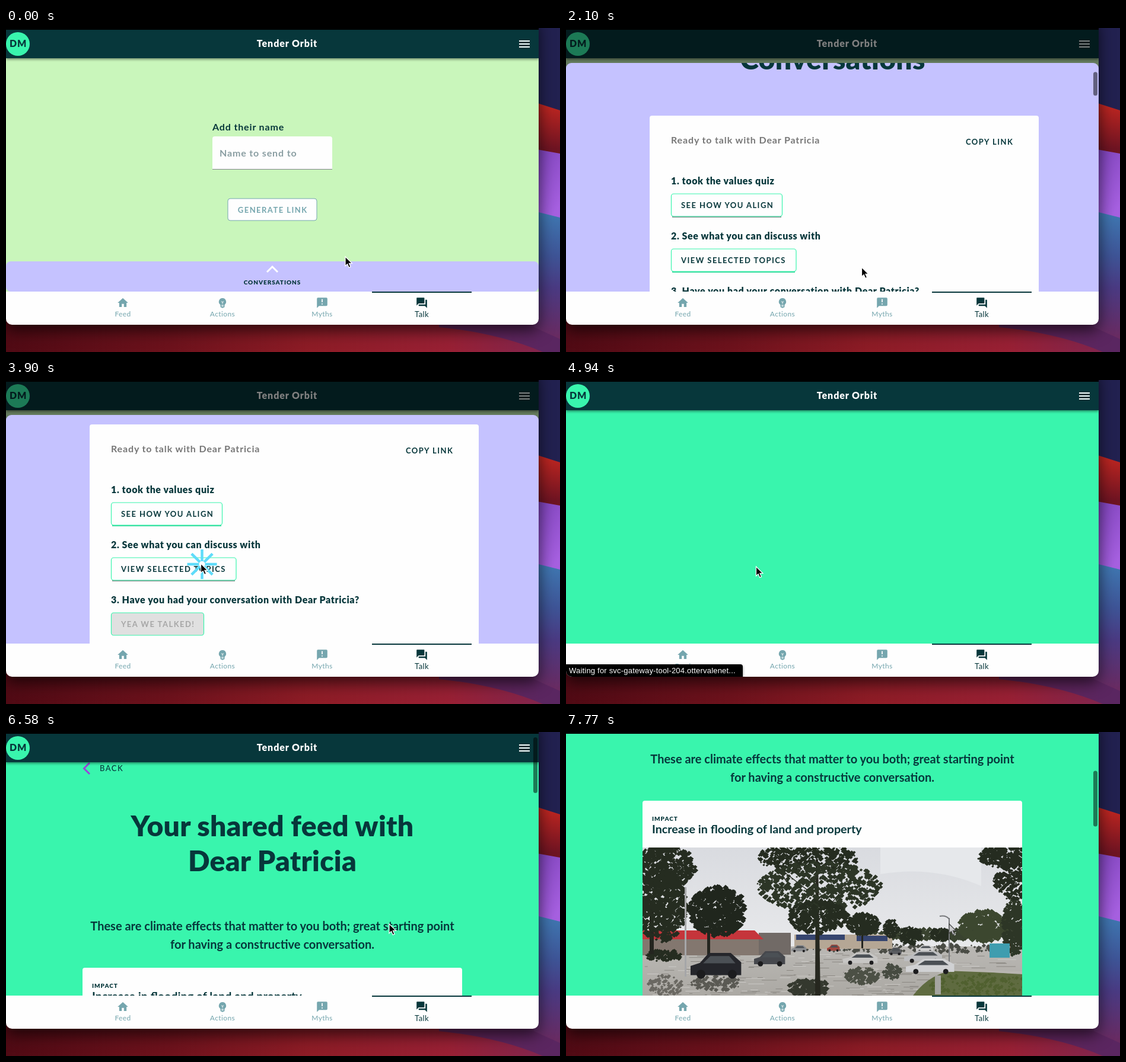
Recreate the animation shown at these times as an HTML page. Size 934 px wide and 547 px high, loop 8000 ms.

```html
<!DOCTYPE html>
<html lang="en">
<head>
<meta charset="utf-8">
<title>Shared feed demo</title>
<style>
  html, body { margin: 0; height: 100%; overflow: hidden; background: #000; }
  svg { display: block; width: 100vw; height: 100vh; }
  filter { color-interpolation-filters: sRGB; }
  text { font-family: Lato, "Open Sans", sans-serif; font-weight: 700; fill: #07373b; white-space: pre; }
  .mid { text-anchor: middle; }
  .h1 { font-size: 48px; font-weight: 900; letter-spacing: .3px; text-anchor: middle; }
  .step { font-size: 16px; font-weight: 900; letter-spacing: .6px; }
  .label { font-size: 16px; letter-spacing: .85px; }
  .btn { font-size: 13px; letter-spacing: 1.45px; }
  .tiny { font-size: 10px; font-weight: 900; letter-spacing: .95px; }
  .body { font-size: 20px; }
  .nav { fill: #75a6ae; }
  .nav text { font-size: 12px; font-weight: 400; letter-spacing: .4px; text-anchor: middle; fill: inherit; }
  .nav.on { fill: #07373b; }
  .nav.on text { font-size: 13px; }
  .chevron { fill: none; stroke: #fff; stroke-width: 3; }
  .box { fill: #fefefe; stroke: #39f5ad; stroke-width: 1.2; }
</style>
</head>
<body>
<svg viewBox="0 0 934 547" preserveAspectRatio="none">
  <defs>
    <linearGradient id="floor">
      <stop stop-color="#500a14"/><stop offset=".3" stop-color="#6d121c"/><stop offset=".55" stop-color="#8d1c26"/>
      <stop offset=".8" stop-color="#982034"/><stop offset="1" stop-color="#7c2652"/>
    </linearGradient>
    <linearGradient id="red" x2="0" y2="1"><stop stop-color="#c32721"/><stop offset=".75" stop-color="#6e1422"/></linearGradient>
    <linearGradient id="violet" x2=".5" y2="1"><stop stop-color="#7a40b6"/><stop offset="1" stop-color="#a660e0"/></linearGradient>
    <linearGradient id="blue" x2="0" y2="1">
      <stop stop-color="#3f79b2"/><stop offset=".35" stop-color="#3e5496"/><stop offset=".6" stop-color="#4a3a82"/><stop offset="1" stop-color="#6a2a60"/>
    </linearGradient>
    <linearGradient id="sky" x2="0" y2="1"><stop stop-color="#d9dbe0"/><stop offset="1" stop-color="#e8e9eb"/></linearGradient>
    <linearGradient id="water" x2="0" y2="1"><stop stop-color="#bab8b4"/><stop offset="1" stop-color="#a19e98"/></linearGradient>
    <filter id="windowShadow" x="-10%" y="-10%" width="120%" height="125%"><feDropShadow dx="0" dy="10" stdDeviation="13" flood-opacity=".65"/></filter>
    <filter id="barShadow" x="-5%" y="-20%" width="110%" height="160%"><feDropShadow dx="0" dy="2" stdDeviation="2" flood-opacity=".45"/></filter>
    <clipPath id="windowClip"><path d="M0 3H898V491a10 10 0 0 1-10 10H10a10 10 0 0 1-10-10z"/></clipPath>
    <clipPath id="pageClip"><rect y="3" width="898" height="442"/></clipPath>
    <clipPath id="panelClip"><rect y="59" width="898" height="410" rx="9"/></clipPath>
    <clipPath id="photoClip"><rect x="129" y="195" width="640" height="300"/></clipPath>
  </defs>

  <!-- desktop -->
  <rect y="480" width="934" height="67" fill="url(#floor)"/>
  <path d="M730 495H934V547H905Q830 515 730 505z" fill="#4c2768" opacity=".7"/>
  <rect x="890" width="44" height="145" fill="#222150"/>
  <path d="M890 125L934 139V230H890z" fill="url(#red)"/>
  <path d="M890 204L934 212V330H890z" fill="url(#violet)"/>
  <path d="M890 309L934 320V525L890 505z" fill="url(#blue)"/>
  <rect y="-20" width="898" height="521" rx="10" fill="#fefefe" filter="url(#windowShadow)"/>
  <rect width="898" height="3"/>

  <g clip-path="url(#windowClip)">
    <g clip-path="url(#pageClip)">
      <g id="invite">
        <rect width="898" height="445" fill="#c9f6bb"/>
        <text class="label" x="348" y="173">Add their name</text>
        <path d="M348 239V187a4 4 0 0 1 4-4H546a4 4 0 0 1 4 4V239z" fill="#fefefe"/>
        <path d="M348 238.5H550" stroke="#82878a"/>
        <text class="label" x="360" y="217" style="fill:#8a9ea2">Name to send to</text>
        <rect x="374" y="288" width="150" height="37" rx="4" fill="#fefefe" stroke="#75a6ae"/>
        <text class="btn mid" x="449.7" y="311.5" style="fill:#75a6ae">GENERATE LINK</text>
        <rect y="394" width="898" height="51" rx="8" fill="#c5c2ff"/>
        <path class="chevron" d="M440 412l9-9 9 9"/>
        <text class="tiny mid" x="449" y="433">CONVERSATIONS</text>
      </g>

      <g id="feed">
        <rect width="898" height="445" fill="#39f5ad"/>
        <g id="feedContent">
          <path d="M141 77l-9.500 9.500 9.500 9.500" fill="none" stroke="#9a45dc" stroke-width="3"/>
          <text class="btn" x="158" y="91" style="font-weight:500">BACK</text>
          <text class="h1" x="449" y="201">Your shared feed with</text>
          <text class="h1" x="449" y="260">Dear Patricia</text>
          <text class="body mid" x="449" y="359.500">These are climate effects that matter to you both; great starting point</text>
          <text class="body mid" x="449" y="391">for having a constructive conversation.</text>
          <rect x="129" y="423" width="640" height="420" rx="4" fill="#fefefe"/>
          <text class="tiny" x="145" y="456.500">IMPACT</text>
          <text x="145" y="478" style="font-size:19.700px">Increase in flooding of land and property</text>
          <g transform="translate(0 307)"><g id="photo" clip-path="url(#photoClip)"></g></g>
        </g>
      </g>
    </g>

    <g id="header" filter="url(#barShadow)">
      <rect y="3" width="898" height="48" fill="#07373b"/>
      <circle cx="20" cy="27" r="20" fill="#39f5ad"/>
      <text class="mid" x="20.500" y="32" style="font-size:16px;font-weight:900;letter-spacing:.8px">DM</text>
      <text class="mid" x="474" y="32" style="font-size:16px;font-weight:900;letter-spacing:.9px;fill:#fff">Tender Orbit</text>
      <path d="M865 22h18m-18 5h18m-18 5h18" stroke="#fff" stroke-width="2"/>
    </g>

    <rect id="dim" width="898" height="445"/>
    <g clip-path="url(#pageClip)">
      <g id="drawer"><g clip-path="url(#panelClip)">
        <rect y="59" width="898" height="410" fill="#c5c2ff"/>
        <g id="list">
          <path class="chevron" d="M440 72l9 9 9-9"/>
          <text class="h1" x="449.500" y="212">Conversations</text>
          <rect x="141" y="290" width="656" height="500" rx="4" fill="#fefefe"/>
          <text class="label" x="177" y="337" style="fill:#777">Ready to talk with Dear Patricia</text>
          <text class="btn" x="674" y="339">COPY LINK</text>
          <text class="step" x="177" y="405.500">1. took the values quiz</text>
          <path id="shadeAlign" d="M179 461H363" stroke-width="2"/>
          <rect class="box" x="177.500" y="422" width="187" height="38" rx="4"/>
          <text class="btn" x="194" y="446">SEE HOW YOU ALIGN</text>
          <text class="step" x="177" y="498.500">2. See what you can discuss with</text>
          <path id="shadeTopics" d="M179 554H386" stroke-width="2"/>
          <rect class="box" x="177.500" y="515" width="210.500" height="38" rx="4"/>
          <text class="btn" x="194" y="539">VIEW SELECTED TOPICS</text>
          <text class="step" x="177" y="591.500">3. Have you had your conversation with Dear Patricia?</text>
          <rect class="box" x="177.500" y="608" width="156" height="38" rx="4" style="fill:#e0e0e0"/>
          <text class="btn" x="194" y="632" style="fill:#a6a6a6">YEA WE TALKED!</text>
        </g>
      </g></g>
    </g>
    <rect id="thumb" x="889" width="7" rx="3.500" opacity=".5"/>

    <rect x="617" y="445" width="168" height="2" fill="#07373b"/>
    <g id="nav"></g>
    <g id="status">
      <path d="M-9 480H294a4 4 0 0 1 4 4V510H-9z" filter="url(#barShadow)"/>
      <text x="5" y="495" style="font:13px 'Liberation Sans',sans-serif;letter-spacing:.2px;fill:#fff">Waiting for svc-gateway-tool-204.ottervalenet...</text>
    </g>
  </g>

  <path id="burst" stroke="#5fdcfa" stroke-width="4.500"/>
  <path id="cursor" d="M0 0V15.800l3.600-3.400 2.600 6 2.800-1.200-2.600-5.800h5z" stroke="#fff" stroke-width="1.200"/>
</svg>

<script>
const LOOP = 8000, STEP = 149.3; // the screen is sampled at about 6.7 pictures a second
const $ = id => document.getElementById(id);
const show = (id, on) => $(id).setAttribute('visibility', on ? 'visible' : 'hidden');
const set = (id, attrs) => { for (const key in attrs) $(id).setAttribute(key, attrs[key]); };
const move = (id, x, y) => set(id, { transform: `translate(${x} ${y})` });

// Linear interpolation through [step, value...] points
function track(n, points, column = 1) {
  const i = points.findIndex(p => p[0] >= n);
  if (i < 0) return points[points.length - 1][column];
  if (i === 0) return points[0][column];
  const a = points[i - 1], b = points[i];
  return a[column] + (b[column] - a[column]) * (n - a[0]) / (b[0] - a[0]);
}

// Bottom navigation
$('nav').innerHTML = [
  ['Feed', 'M10 20v-6h4v6h5v-8h3L12 3 2 12h3v8z'],
  ['Actions', 'M12 3a7 7 0 0 0-4.700 12.200c.5.400.7.900.7 1.500V19a2 2 0 0 0 2 2h.3a2 2 0 0 0 3.400 0H14a2 2 0 0 0 2-2v-2.300c0-.6.200-1.100.6-1.500A7 7 0 0 0 12 3zm2 16h-4v-1h4zm0-2h-4v-1h4zm-1.500-5.600V14h-1v-2.600L9.700 9.600l.7-.7 1.600 1.600 1.600-1.600.7.700z'],
  ['Myths', 'M20 2H4a2 2 0 0 0-2 2V22l4-4h14a2 2 0 0 0 2-2V4a2 2 0 0 0-2-2zm-7 9h-2V5h2zm0 4h-2v-2h2z'],
  ['Talk', 'M21 6h-2v9H6v2a1 1 0 0 0 1 1h11l4 4V7a1 1 0 0 0-1-1zm-4 6V3a1 1 0 0 0-1-1H3a1 1 0 0 0-1 1v14l4-4h10a1 1 0 0 0 1-1z']
].map(([name, icon], i) => `<g class="nav ${i === 3 ? 'on' : ''}" transform="translate(${197 + 168 * i} 464)">
  <path d="${icon}" fill-rule="evenodd" transform="scale(.88) translate(-12 -12)"/><text y="${i === 3 ? 24 : 22.5}">${name}</text></g>`).join('');

// Flooded street, in flat shapes
let seed = 7;
const random = () => (seed = seed * 16807 % 2147483647) / 2147483647;
const shape = (d, fill, extra = '') => `<path d="${d}" fill="${fill}" ${extra}/>`;
const rect = (x, y, w, h, fill) => shape(`M${x} ${y}h${w}v${h}h${-w}z`, fill);

function foliage(cx, cy, rx, ry, count, size, fill = '#252c20') {
  let d = '';
  for (let i = 0; i < count; i++) {
    const angle = random() * 2 * Math.PI, far = Math.sqrt(random()), r = size * (.4 + random());
    const x = cx + Math.cos(angle) * far * rx, y = cy + Math.sin(angle) * far * ry;
    d += `M${x.toFixed(1)} ${y.toFixed(1)}l${r.toFixed(1)} ${(-r).toFixed(1)} ${r.toFixed(1)} ${(r * .8).toFixed(1)} ${(-r).toFixed(1)} ${r.toFixed(1)}z`;
  }
  return shape(d, fill);
}

function ripples(count, fill) {
  let d = '';
  for (let i = 0; i < count; i++) {
    const y = 372 + random() * 75, w = 5 + random() * 28;
    d += `M${(129 + random() * 600).toFixed(1)} ${y.toFixed(1)}h${w.toFixed(1)}v1h${(-w).toFixed(1)}z`;
  }
  return shape(d, fill);
}

function car(x, y, w, h, paint) {
  const wheel = dx => `<circle cx="${x + w * dx}" cy="${y + h * .82}" r="${h * .17}" fill="#1c1c1e"/>`;
  return shape(`M${x} ${y + h * .85}v${-h * .35}l${w * .18} ${-h * .12} ${w * .17} ${-h * .38}h${w * .42}l${w * .2} ${h * .36}v${h * .49}z`, paint)
    + shape(`M${x + w * .24} ${y + h * .4}l${w * .14} ${-h * .28}h${w * .36}l${w * .12} ${h * .28}z`, '#4b5055')
    + wheel(.2) + wheel(.8);
}

$('photo').innerHTML = [
  rect(129, 195, 640, 170, 'url(#sky)'),
  shape('M530 195H700V260Q620 225 530 240z', '#e6e8eb'),
  rect(129, 362, 640, 140, 'url(#water)'),
  ripples(150, '#8b8882'), ripples(90, '#cbc9c6'),
  foliage(640, 342, 140, 10, 320, 4, '#39422f'), foliage(580, 366, 190, 7, 160, 3.5, '#4a4c45'),
  rect(129, 349, 200, 28, '#83776f'), rect(325, 339, 54, 37, '#716a66'),
  shape('M129 335H318L333 350H129z', '#c5353b'),
  rect(385, 342, 165, 24, '#b5a795'), rect(388, 342, 82, 9, '#36456f'), rect(490, 344, 52, 9, '#36456f'),
  foliage(160, 378, 32, 9, 110, 3.5),
  shape('M585 445Q615 405 660 402L769 409V500H585z', '#5f6b40'),
  foliage(700, 428, 90, 20, 200, 3, '#50602f'),
  shape('M640 400L769 404V408L640 403z', '#b8b5b0'),
  foliage(250, 425, 45, 12, 110, 3.5, '#5a5953'), foliage(405, 432, 34, 15, 210, 3.5, '#34382e'),
  foliage(495, 412, 28, 14, 120, 3.5, '#4c5045'), foliage(546, 405, 14, 14, 80, 3, '#464b41'),
  foliage(165, 428, 30, 18, 110, 3, '#6a6862'),
  rect(141, 290, 7, 85, '#24251f'), rect(238, 330, 5, 48, '#24251f'), rect(498, 335, 3, 30, '#24251f'),
  foliage(162, 228, 52, 36, 640, 4), foliage(156, 295, 44, 60, 720, 4.2),
  foliage(251, 303, 48, 42, 820, 4.2, '#20261d'),
  shape('M421 215h4l4 230h-9z', '#26271f'),
  shape('M424 330L360 235M424 320L490 235M424 280L340 215', 'none', 'stroke="#30322a" stroke-width="1.5"'),
  foliage(405, 212, 85, 26, 400, 3.8), foliage(424, 262, 104, 42, 760, 3.8, '#2c3526'), foliage(420, 312, 50, 28, 380, 3.8),
  foliage(497, 324, 27, 19, 300, 3.5), foliage(545, 332, 12, 15, 120, 3.2),
  foliage(578, 344, 19, 15, 170, 3.2), foliage(628, 342, 16, 12, 120, 3.2),
  foliage(700, 328, 42, 26, 520, 4, '#3c472f'), foliage(752, 330, 20, 48, 400, 4, '#2d3626'),
  foliage(740, 210, 48, 20, 330, 3.8), foliage(752, 255, 34, 28, 220, 3.8),
  rect(200, 262, 3, 151, '#a5a6a8'), rect(645, 314, 2, 88, '#77797c'),
  shape('M646 316Q641 309 630 311', 'none', 'stroke="#77797c" stroke-width="2"'),
  rect(714, 357, 34, 24, '#3f9daf'), rect(622, 411, 10, 32, '#a5a5a0'),
  car(210, 373, 88, 44, '#25262b'), car(317, 370, 54, 26, '#46484d'), car(467, 373, 60, 20, '#c7c6c4'),
  car(380, 360, 26, 12, '#8b8d90'), car(544, 364, 22, 13, '#5a5c60'), car(590, 360, 30, 12, '#d2d2d2'),
  car(440, 359, 22, 12, '#a2473f'), car(570, 369, 66, 21, '#bdbec0'), car(573, 383, 84, 26, '#d0d1d3')
].join('');

const CURSOR = [[2, 572, 386], [4, 498, 407], [9, 498, 407], [14, 498.5, 404], [22, 498.5, 404],
  [25, 328.5, 310], [28, 328.5, 310], [33, 320.5, 315], [39, 320.5, 315], [42, 646, 324]];
const OPEN = [[4, 0], [5, .45], [6, .9], [7, 1]];
const LIST_SCROLL = [[8, 0], [10, 18], [12, 76], [14, 142], [15, 192], [16, 213], [20, 215]];
const FEED_SCROLL = [[42, 0], [43, 8], [44, 25], [46, 98], [49, 220], [51, 288], [52, 307]];

function draw(n) {
  const onFeed = n >= 30, open = track(n, OPEN);
  show('invite', !onFeed);
  show('feed', onFeed);
  show('drawer', !onFeed && open > 0);
  set('dim', { opacity: onFeed ? 0 : open * .5 });
  move('drawer', 0, 386 * (1 - open));

  const listY = track(n, LIST_SCROLL), feedY = track(n, FEED_SCROLL);
  move('list', 0, -listY);
  set('shadeAlign', { stroke: n < 23 ? '#8a9a96' : '#3fd9a0' });
  set('shadeTopics', { stroke: n < 23 ? '#3fd9a0' : '#8a9a96' });

  $('feedContent').style.display = n >= 35 ? '' : 'none';
  move('feedContent', 0, -feedY);
  move('header', 0, track(n, [[47, 0], [49, -56]]));
  set('status', { opacity: track(n, [[31, 0], [32, 1], [35, 1], [38, 0]]) });

  show('thumb', n >= 43 || (n >= 9 && n < 20));
  set('thumb', onFeed ? { y: 4 + feedY * .2, height: 94 } : { y: 65 + listY * .065, height: 40 });

  const x = track(n, CURSOR), y = track(n, CURSOR, 2);
  move('cursor', x, y);
  set('cursor', { fill: n > 51 ? '#c9cacc' : '#000', stroke: n > 51 ? '#444' : '#fff' });

  let rays = '';
  for (let a = 0; a < 8; a++) {
    const c = Math.cos(a * Math.PI / 4), s = Math.sin(a * Math.PI / 4);
    rays += `M${c * 5} ${s * 5}L${c * 25} ${s * 25}`;
  }
  set('burst', { d: rays });
  show('burst', n === 4 || n === 26);
  move('burst', x + 2, y + 1);
}

function tick() {
  draw(Math.floor(performance.now() % LOOP / STEP));
  requestAnimationFrame(tick);
}
tick();
</script>
</body>
</html>
```
